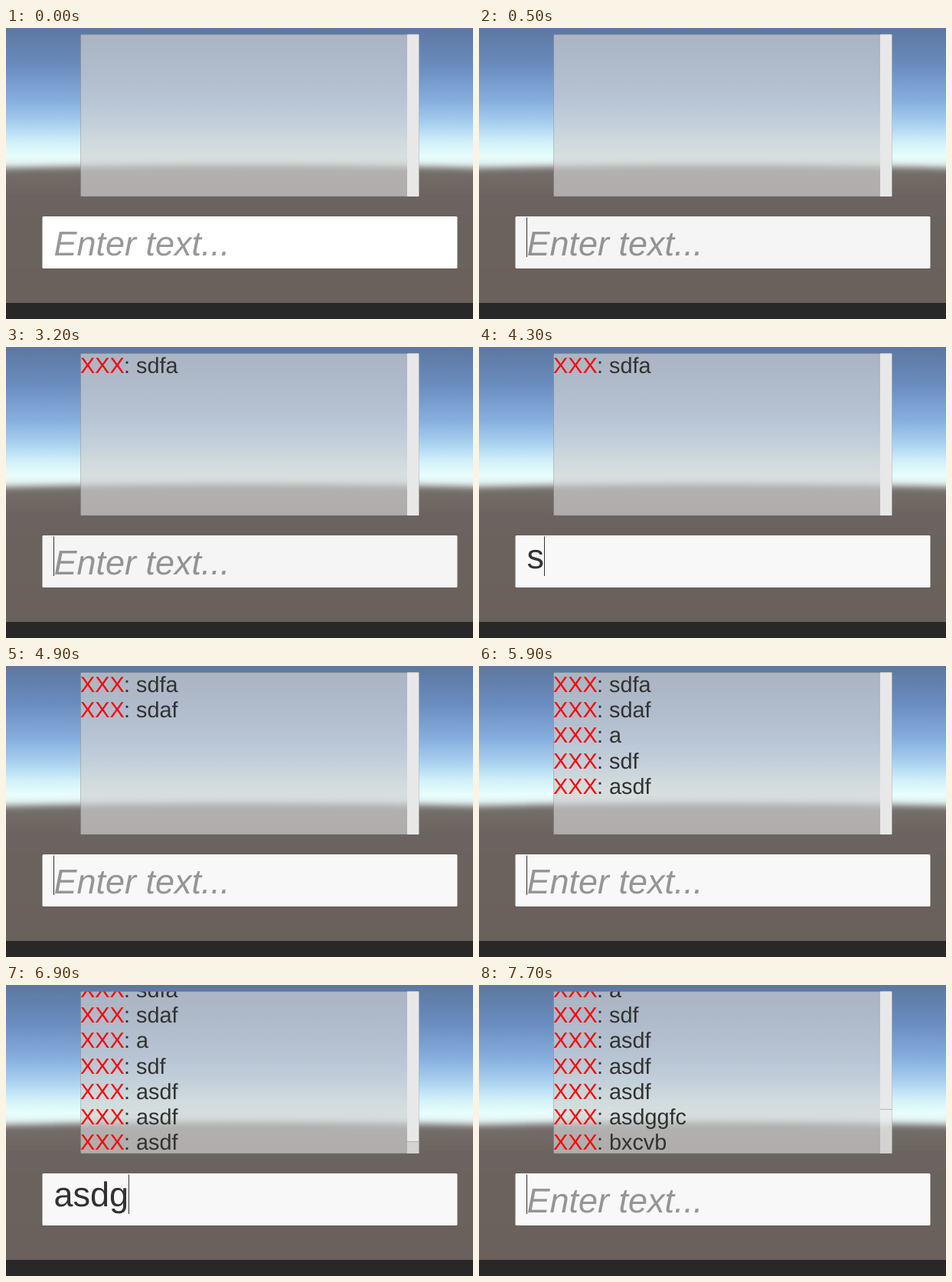
An HTML page that plays this animation: 610x380 px, repeating every 8000 ms.

```html
<!DOCTYPE html>
<html lang="en">
<head>
<meta charset="utf-8">
<title>Chat box</title>
<style>
  html, body { margin: 0; width: 100%; height: 100%; overflow: hidden; background: #282828; }
  svg { display: block; width: 610px; height: 380px; }
  text { font-family: "Liberation Sans", Arial, sans-serif; fill: #323232; white-space: pre; text-rendering: geometricPrecision; }
  .row text { font-size: 28.8px; }
  .row .name { fill: #f00; }
  .field { font-size: 45px; }
  #hint { font-style: italic; fill-opacity: .5; }
</style>
</head>
<body>
<svg viewBox="0 0 610 380">
  <defs>
    <linearGradient id="sky" gradientUnits="userSpaceOnUse" x1="0" y1="0" x2="0" y2="190">
      <stop offset="0" stop-color="#5d779f"/>
      <stop offset=".26" stop-color="#6a8cbf"/>
      <stop offset=".5" stop-color="#86aedd"/>
      <stop offset=".66" stop-color="#a9d0ef"/>
      <stop offset=".79" stop-color="#d3f1f9"/>
      <stop offset=".88" stop-color="#e8fdfc"/>
      <stop offset="1" stop-color="#dcebea"/>
    </linearGradient>
    <linearGradient id="ground" gradientUnits="userSpaceOnUse" x1="0" y1="175" x2="0" y2="359">
      <stop offset="0" stop-color="#77716e"/>
      <stop offset=".25" stop-color="#6b635e"/>
      <stop offset="1" stop-color="#6a615c"/>
    </linearGradient>
    <filter id="haze" filterUnits="userSpaceOnUse" x="-60" y="120" width="730" height="340">
      <feGaussianBlur stdDeviation="4"/>
    </filter>
    <clipPath id="view"><rect x="97" y="8.5" width="427" height="211.5"/></clipPath>
  </defs>

  <rect width="610" height="380" fill="url(#sky)"/>
  <path d="M-50 184Q305 174 660 184V430H-50Z" fill="url(#ground)" filter="url(#haze)"/>
  <rect y="359" width="610" height="21" fill="#282828"/>

  <rect x="97.5" y="8.5" width="442" height="211.5" rx="1" fill="#d0d0d0" fill-opacity=".68" stroke="#777" stroke-opacity=".35"/>
  <g clip-path="url(#view)"><g id="rows"></g></g>
  <rect x="524" y="8.5" width="15.5" height="211.5" fill="#fff" fill-opacity=".45"/>
  <rect id="thumb" x="524" y="8.5" width="15" rx="1" fill="#e8e8e8"/>
  <rect id="edge" x="524" width="15" height="1" fill="#999" fill-opacity=".6"/>

  <rect id="box" x="47.5" y="246" width="542" height="68" rx="1.5"/>
  <text id="hint" class="field" x="62.5" y="296.5">Enter text...</text>
  <text id="entry" class="field" x="62.5" y="289"></text>
  <rect id="caret" y="247.5" width="1" height="51.5" fill="#323232"/>
</svg>
<script>
  const LOOP = 8000, LINE = 33.2;
  const $ = id => document.getElementById(id);
  const messages = ["sdfa", "sdaf", "a", "sdf", "asdf", "asdf", "asdf", "asdggfc", "bxcvb"];

  // time, typed text, caret shown, messages sent
  const steps = [
    [0, "", 0, 0], [500, "", 1, 0],
    [600, "s", 1, 0], [700, "sd", 1, 0], [800, "sdf", 1, 0], [900, "sdfa", 1, 0], [1000, "sdfa ", 1, 0],
    [1400, "sdfa ", 0, 0], [1600, "", 1, 1],
    [2000, "", 0, 1], [3200, "", 1, 1], [3700, "", 0, 1], [4100, "", 1, 1],
    [4300, "s", 1, 1], [4500, "sd", 1, 1], [4700, "sda", 1, 1], [4800, "sdaf", 1, 1], [4900, "", 1, 2],
    [5000, "a", 1, 2], [5100, "", 1, 3],
    [5200, "sd", 1, 3], [5300, "sdf", 1, 3], [5400, "", 1, 4],
    [5700, "as", 1, 4], [5800, "asdf", 1, 4], [5900, "", 1, 5],
    [6000, "as", 1, 5], [6100, "asdf", 1, 5], [6200, "", 1, 6],
    [6300, "a", 1, 6], [6400, "asd", 1, 6], [6500, "asdf", 1, 6], [6600, "", 1, 7],
    [6700, "a", 1, 7], [6800, "asd", 1, 7], [6900, "asdg", 1, 7],
    [7100, "asdgg", 1, 7], [7200, "asdggfc", 1, 7], [7300, "b", 1, 8],
    [7500, "bxc", 1, 8], [7600, "bxcvb", 1, 8], [7700, "", 1, 9]
  ];

  $("rows").innerHTML = messages.map((m, i) => {
    const y = 34 + i * LINE;
    return `<g class="row"><text class="name" x="97" y="${y}">XXX</text><text x="154" y="${y}">: ${m}</text></g>`;
  }).join("");
  const rows = [...$("rows").children];

  const show = (el, on) => el.setAttribute("visibility", on ? "visible" : "hidden");

  function draw(t) {
    const [, typed, caretOn, sent] = steps.findLast(s => s[0] <= t);
    rows.forEach((row, i) => show(row, i < sent));

    // The list overflows from the seventh message on
    const extra = sent - 7;
    const scroll = extra < 0 ? 0 : 18 + extra * LINE;
    const bottom = extra < 0 ? 220 : 204 - extra * 21;
    $("rows").setAttribute("transform", `translate(0 ${-scroll})`);
    $("thumb").setAttribute("height", bottom - 8.5);
    $("edge").setAttribute("y", bottom);
    show($("edge"), extra >= 0);

    $("box").setAttribute("fill", t < 500 ? "#fff" : t < 4300 ? "#f5f5f5" : "#f8f8f8");
    $("entry").textContent = typed;
    show($("hint"), !typed);
    const width = typed ? $("entry").getComputedTextLength() : 0;
    $("caret").setAttribute("x", Math.floor(62.5 + width));
    show($("caret"), caretOn);
  }

  const start = performance.now();
  function tick() {
    draw((performance.now() - start) % LOOP);
    requestAnimationFrame(tick);
  }
  tick();
</script>
</body>
</html>
```
